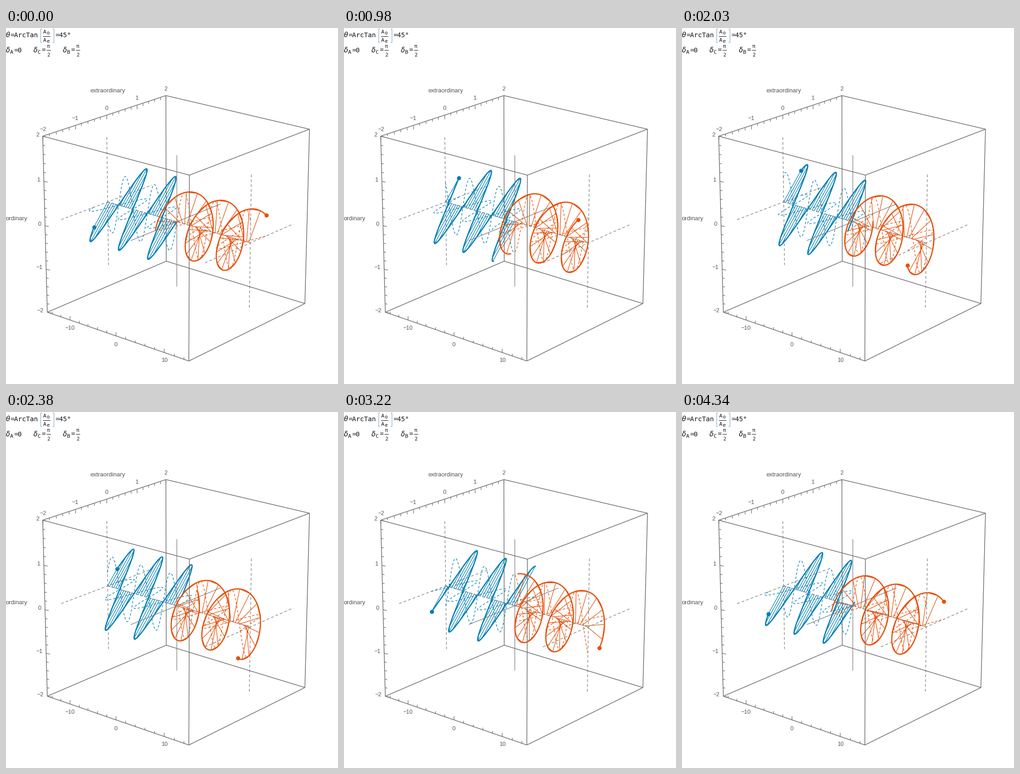
A matplotlib script for the animation above (4410 ms loop, 723x774 px).

```python
import itertools

import matplotlib.pyplot as plt
import numpy as np
from matplotlib.animation import FuncAnimation
from matplotlib.patches import Rectangle

W, H, DPI = 723, 774, 100
PT = 72 / DPI
FRAMES, INTERVAL = 63, 70
L, R, AXIS = 15, 2, 1.5
AMP = np.sin(np.pi / 4)
BLUE, ORANGE, BOX, GRAY, INK = "#007fb4", "#e6500a", "#666666", "#808080", "#111111"

plt.rcParams["lines.scale_dashes"] = False
fig = plt.figure(figsize=(W / DPI, H / DPI), dpi=DPI, facecolor="white")
ax = fig.add_axes([0, 0, 1, 1])
ax.set(xlim=(0, W), ylim=(H, 0))
ax.axis("off")


# ---- camera: fitted to the eight corners of the box -------------------------
CORNERS = list(itertools.product((-L, L), (-R, R), (-R, R)))
SCREEN = [(90, 618), (80, 235), (349, 507), (348, 147),
          (398, 724), (399.5, 320), (651, 599), (661, 220)]


def fit_camera():
    rows, rhs = [], []
    for (z, e, v), (x, y) in zip(CORNERS, SCREEN):
        p = [z / L, e / R, v / R]
        rows.append(p + [1, 0, 0, 0, 0] + [-x * c for c in p])
        rows.append([0, 0, 0, 0] + p + [1] + [-y * c for c in p])
        rhs += [x, y]
    sol = np.linalg.lstsq(np.array(rows), np.array(rhs), rcond=None)[0]
    return np.append(sol, 1).reshape(3, 4)


CAM = fit_camera()


def project(z, e, v):
    z, e, v = np.broadcast_arrays(z, e, v)
    x, y, w = CAM @ np.array([z / L, e / R, v / R, np.ones(z.shape)])
    return x / w, y / w


# ---- drawing helpers --------------------------------------------------------
def stroke(x, y, color, width, order, dash=None):
    style = (0, tuple(d * PT for d in dash)) if dash else "-"
    return ax.plot(x, y, color=color, lw=width * PT, ls=style, zorder=order,
                   solid_capstyle="butt", solid_joinstyle="round")[0]


def segment(a, b, color, width, order, dash=None):
    return stroke(*project(*np.array([a, b], float).T), color, width, order, dash)


def label(x, y, s, size, font="DejaVu Sans Mono", color=INK, ha="left",
          va="baseline", **kw):
    return ax.text(x, y, s, fontsize=size * PT, family=font, color=color,
                   ha=ha, va=va, zorder=20, **kw)


# ---- box, ticks and axes ----------------------------------------------------
for a, b in itertools.combinations(CORNERS, 2):
    if sum(p != q for p, q in zip(a, b)) == 1:
        near = all(c in (a, b) for c in [(L, -R, R)])
        segment(a, b, BOX, 1.4, 10 if near else 1)


def tick(point, dx, dy, major):
    x, y = project(*map(float, point))
    k = 8.5 if major else 5
    stroke([x, x + k * dx], [y, y + k * dy], BOX, 1.2, 2)


for i in range(-10, 11):
    tick((-L, i / 5, R), 0, 1, i % 5 == 0)
    tick((-L, -R, i / 5), 0.96, 0.2, i % 5 == 0)
for z in range(-14, 15, 2):
    tick((z, -R, -R), 0, -1, z % 10 == 0)

NUMBERS = [(348, 131, 2), (285, 152, 1), (219, 174, 0), (151, 196, -1), (80, 219, -2),
           (69, 232, 2), (71, 330, 1), (73, 426, 0), (73, 520, -1), (75, 613, -2),
           (139, 652, -10), (239, 687, 0), (345, 722, 10)]
for x, y, n in NUMBERS:
    label(x, y, str(n).replace("-", "\u2212"), 12.5, "Liberation Sans", "#555555",
          "center", "center_baseline")

for x, y, s, right in [(183, 140, "extraordinary", 256), (0, 418, "ordinary", 46.5)]:
    name = label(x, y, s, 13, "Liberation Sans", "#555555")
    name.set_clip_path(Rectangle((0, y - 20), right, 30, transform=ax.transData))

for z, order, dash in [(-L, 2, (6, 4.5)), (0, 5, None), (L, 9, (6, 4.5))]:
    segment((z, 0, AXIS), (z, 0, -AXIS), GRAY, 1.3, order, dash)
    segment((z, -AXIS, 0), (z, AXIS, 0), GRAY, 1.3, order, dash)
segment((-L, 0, 0), (L, 0, 0), GRAY, 1.2, 8, (6, 4.5))


# ---- header -----------------------------------------------------------------
def fraction(x, y, top, bottom, width):
    label(x + width / 2, y - 5, top, 11, ha="center")
    stroke([x, x + width], [y, y], INK, 1, 20)
    label(x + width / 2, y + 14, bottom, 11, ha="center")


def bracket(x, d):
    stroke([x + d, x, x, x + d], [2, 2, 31, 31], "#8fb4c8", 1.3, 20)


label(0, 20, "\u03b8", 14.5, "DejaVu Sans", style="italic")
label(9.5, 20, "=ArcTan", 14.2)
bracket(75, 3)
bracket(104, -3)
for y, sub in [(12, "o"), (30, "e")]:
    label(81, y, "A", 11.5)
    label(88, y + 2, sub, 10.5)
stroke([80, 96], [17.5, 17.5], INK, 1, 20)
label(107.5, 20, "=45\u00b0", 14.2)

for x, sub in [(0, "A"), (60, "C"), (124, "B")]:
    label(x, 53, "\u03b4", 14.5, "DejaVu Sans", style="italic")
    label(x + 8.5, 56, sub, 11.5)
    label(x + 17, 53, "=0" if sub == "A" else "=", 14.2)
    if sub != "A":
        fraction(x + 27.5, 48, "\u03c0", "2", 9)


# ---- waves ------------------------------------------------------------------
class Wave:
    """Travelling wave with its two components and a zigzag of field vectors."""

    def __init__(self, lo, hi, end, delay, color, order):
        self.z = np.linspace(lo, hi, 400)
        self.end, self.delay = end, delay
        spokes = -L + 0.45 * np.arange(67)
        on = np.arange(67) % 2 == 0
        keep = (spokes >= lo) & (spokes <= hi)
        self.zig = np.repeat(spokes[keep], 2)
        # runs curve, axis, axis, curve so that neighbours join
        self.reach = np.column_stack([on, ~on])[keep].ravel().astype(float)
        self.parts = [stroke([], [], color, 1.3, order, (5, 4)) for _ in range(2)]
        self.fill = stroke([], [], color, 1.25, order + 0.1)
        self.curve = stroke([], [], color, 2.6, order + 0.2)
        self.dot, = ax.plot([], [], "o", color=color, ms=9 * PT, mew=0, zorder=12)

    def field(self, z, t):
        return AMP * np.sin(z - t - self.delay), AMP * np.sin(z - t)

    def update(self, t):
        e, v = self.field(self.z, t)
        self.curve.set_data(*project(self.z, e, v))
        self.parts[0].set_data(*project(self.z, e, 0.0))
        self.parts[1].set_data(*project(self.z, 0.0, v))
        e, v = self.field(self.zig, t)
        self.fill.set_data(*project(self.zig, e * self.reach, v * self.reach))
        tip = np.array([float(self.end)])
        self.dot.set_data(*project(tip, *self.field(tip, t)))
        return [self.curve, self.fill, self.dot, *self.parts]


waves = [Wave(-L, 0, -L, 0, BLUE, 4), Wave(0, L, L, np.pi / 2, ORANGE, 6)]


def update(i):
    t = 2 * np.pi * i / FRAMES
    return [artist for w in waves for artist in w.update(t)]


anim = FuncAnimation(fig, update, frames=FRAMES, interval=INTERVAL,
                     init_func=lambda: update(0), repeat=True, repeat_delay=0)
plt.show()
```
